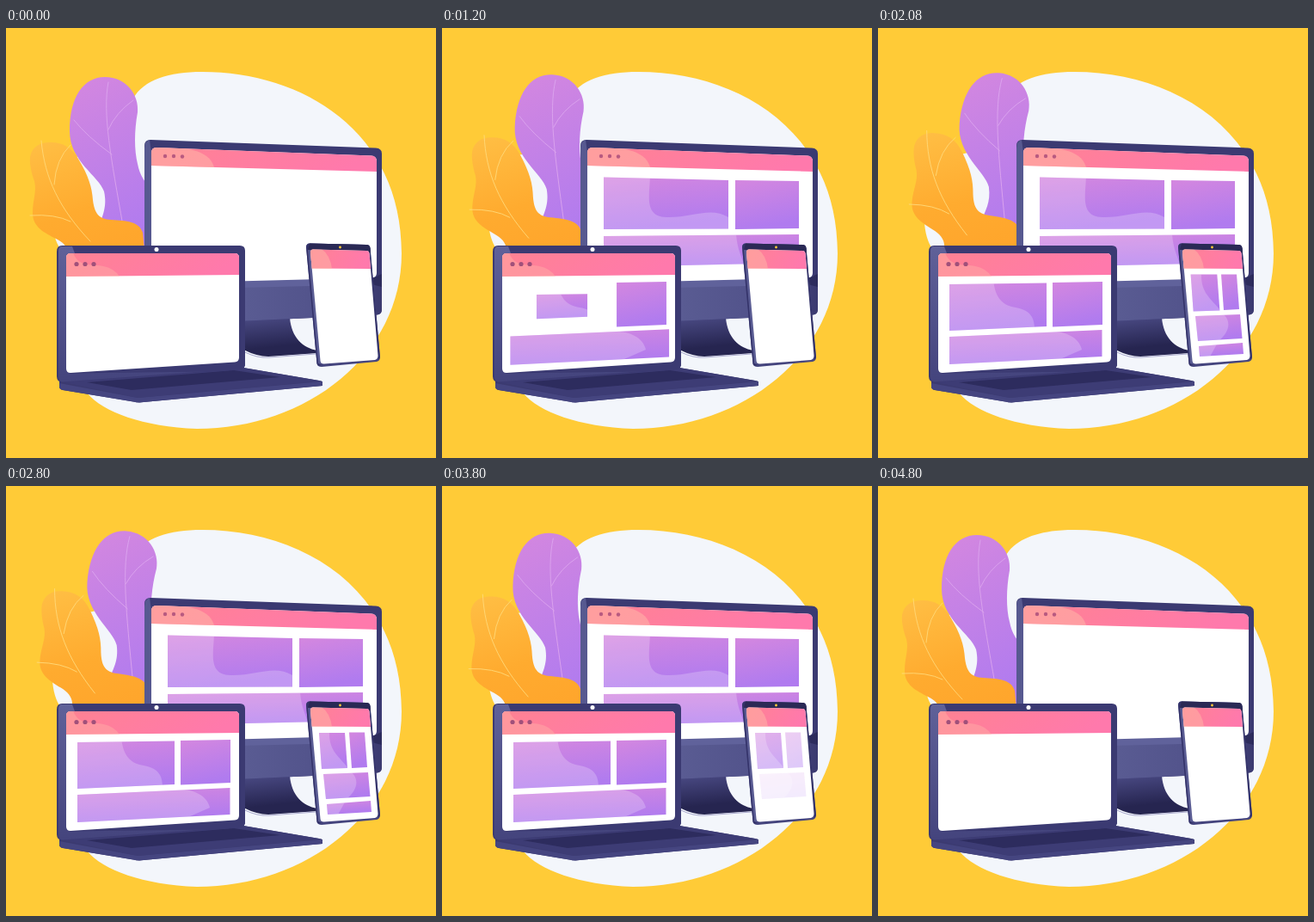
Recreate the animation shown at these times as an HTML page. Size 500 px wide and 500 px high, loop 4840 ms.

```html
<!DOCTYPE html>
<html lang="en">
<head>
<meta charset="utf-8">
<title>Responsive screens</title>
<style>
  html, body { margin: 0; width: 100%; height: 100%; overflow: hidden; background: #ffcb37; }
  svg { display: block; width: 100%; height: 100%; }
  .vein { fill: none; stroke-width: .9; stroke-linecap: round; }
</style>
</head>
<body>
<svg viewBox="0 0 500 500">
  <defs>
    <linearGradient id="violet" x2=".25" y2="1"><stop stop-color="#d487df"/><stop offset="1" stop-color="#b07bef"/></linearGradient>
    <linearGradient id="orange" x2=".3" y2="1"><stop stop-color="#ffbf45"/><stop offset=".55" stop-color="#ffab2f"/><stop offset="1" stop-color="#ffa42b"/></linearGradient>
    <linearGradient id="pink" x2="1" y2=".2"><stop stop-color="#ff8292"/><stop offset="1" stop-color="#ff79ac"/></linearGradient>
    <linearGradient id="chin"><stop stop-color="#5a5c93"/><stop offset=".55" stop-color="#52538b"/><stop offset="1" stop-color="#3b3a70"/></linearGradient>
    <linearGradient id="stand" x2=".2" y2="1"><stop stop-color="#4a4a84"/><stop offset=".8" stop-color="#262550"/></linearGradient>
    <linearGradient id="edge" x2="0" y2="1"><stop stop-color="#5f6199"/><stop offset="1" stop-color="#44447d"/></linearGradient>
    <clipPath id="monitorScreen"><path id="monitorShape" d="M175 139L425 148.500Q431 149 431 155V285Q431 290 425 290.500L169 297V145Q169 139 175 139Z"/></clipPath>
    <clipPath id="laptopScreen"><path id="laptopShape" d="M75 262H266Q271 262 271 267V383Q271 388 266 388.500L75 401Q70 401 70 396V267Q70 262 75 262Z"/></clipPath>
    <clipPath id="phoneScreen"><path id="phoneShape" d="M357 257.500L419 259Q422 259 422.500 262L432.500 381Q432.500 385 429 386L370 390.500Q366 391 365.500 387L354 261Q354 257.500 357 257.500Z"/></clipPath>
  </defs>

  <path fill="#f3f6fb" d="M228 51C345 51 460 120 460 262C460 380 350 466 222 466C160 464 112 446 95 425C88 400 72 280 62 255C50 235 52 200 62 175C75 143 92 149 104 145C140 135 136 105 148 82C160 60 190 51 228 51Z"/>

  <g id="violetLeaf">
    <path fill="url(#violet)" d="M115 57C140 57 155 78 153 98C149 120 149 142 153 158C156 172 160 178 172 190L175 270H105L108 232C112 218 118 208 114 190C108 172 74 155 74 120C74 80 90 57 115 57Z"/>
    <path class="vein" stroke="#dca5ee" d="M119 63C112 100 122 150 136 230M148 84Q128 98 119 118M79 107Q94 126 123 147"/>
  </g>
  <g id="orangeLeaf">
    <path fill="url(#orange)" d="M50 133C64 132 76 138 84 152C96 172 100 185 101 200C103 216 108 222 122 223C140 224 155 225 159 238L165 300H85L73 263C72 254 66 249 58 245C45 238 31 232 31 215C31 200 36 190 33 178C30 170 27 158 28 150C30 138 40 133 50 133Z"/>
    <path class="vein" stroke="#ffd978" d="M41 131C45 175 62 210 98 248M75 136Q58 152 56 182M28 218Q57 216 75 225"/>
  </g>

  <g id="monitor">
    <path fill="url(#stand)" d="M276 338L330 337C332 360 345 372 362 375V378L305 382Q292 382 276 374Z"/>
    <path fill="none" stroke="#a9a9cd" d="M278 377Q292 384 306 383L360 379"/>
    <path fill="#3b3a72" d="M168 130L430 139.500Q437 140 437 146V327Q437 333 431 333.500L270 341L161 300V137Q161 130 168 130Z"/>
    <path fill="#575990" d="M161 140Q161 132 167 130L169 145V300H161Z"/>
    <path fill="#60629b" d="M270 293L437 288V300L270 304Z"/>
    <path fill="url(#chin)" d="M270 302L437 298V327Q437 333 431 333.500L270 341Z"/>
    <path fill="#2d2c5d" d="M425 291L437 286V301L425 298Z"/>
    <use href="#monitorShape" fill="#fff"/>
    <g clip-path="url(#monitorScreen)">
      <path fill="url(#pink)" d="M169 138L432 148V167L169 160Z"/>
      <path fill="#ffb7a8" opacity=".55" d="M169 138L208 140C225 143 238 148 242 162L169 160Z"/>
      <g class="tiles"></g>
    </g>
    <g fill="#b85a80"><circle cx="185" cy="149" r="2.200"/><circle cx="195" cy="149" r="2.200"/><circle cx="205" cy="149.500" r="2.200"/></g>
  </g>

  <g id="laptop">
    <path fill="#3b3a70" d="M62 411L270 394L367 410.500Q368 411 368 416L160 435Q154 436 148 434.500L66 421Q62 420 62 417Z"/>
    <path fill="#454580" d="M62 413L153 430L368 411V416L160 435Q154 436 148 434.500L66 421Q62 420 62 417Z"/>
    <path fill="#3d3c75" d="M62 411L270 394L367 410.500L153 430Z"/>
    <path fill="#2d2c5e" d="M94 412L265 398L319 406L146 421Z"/>
    <path fill="#3b3a72" d="M65 253H272Q278 253 278 259V391Q278 396 272 397L66 412Q59 412 59 405V260Q59 253 65 253Z"/>
    <path fill="url(#edge)" d="M64 254H77L80 262H72L70 265V399L75 402L272 389V396L66 411.500Q61 411 61 405V259Q61 255 64 254Z"/>
    <path fill="#3b3a72" d="M76 401.500L272 388.500L278 382V391Q278 396 272 397L240 399.500Z"/>
    <use href="#laptopShape" fill="#fff"/>
    <g clip-path="url(#laptopScreen)">
      <path fill="url(#pink)" d="M70 261H272V287L70 289Z"/>
      <path fill="#ffb7a8" opacity=".4" d="M70 261H78C84 279 100 274 113 277Q125 279 132 289H70Z"/>
      <g class="tiles"></g>
    </g>
    <g fill="#a0507a"><circle cx="82" cy="274.500" r="2.600"/><circle cx="92" cy="274.500" r="2.600"/><circle cx="102" cy="274.500" r="2.600"/></g>
    <circle cx="175" cy="257.500" r="2.500" fill="#fff"/>
  </g>

  <g id="phone">
    <path fill="url(#edge)" d="M353 250.500L419 252Q423 252 423.500 256L435 383Q435 387 431 388L367 394Q362 394 361.500 390L349 255Q349 250.500 353 250.500Z"/>
    <path fill="#34336a" d="M353 250.500L419 252Q423 252 423.500 256L435 383L433 386L421 262L354 258L366 392Q362 394 361.500 390L349 255Q349 250.500 353 250.500Z"/>
    <path fill="#5a5c93" d="M351 257L354 258L366 391L363 390Z"/>
    <path fill="#2a2955" d="M353 250.500L419 252Q423 252 423.500 256L424 262L351 258Z"/>
    <use href="#phoneShape" fill="#fff"/>
    <g clip-path="url(#phoneScreen)">
      <path fill="url(#pink)" d="M352 257L424 258V280L352 279.500Z"/>
      <path fill="#ffb7a8" opacity=".5" d="M352 257H367Q377 264 379 280H352Z"/>
      <g class="tiles"></g>
    </g>
    <circle cx="388.500" cy="255" r="1.400" fill="#ffcb37"/>
  </g>
</svg>
<script>
const LOOP = 4840, POP = 400, FADE = 320, FADE_STEP = 80;

// Tiles run in order of appearance, bottom first; glow is the fixed light area behind them.
const devices = [
  { id: 'monitor', pop: 190, step: 163, fade: 4250,
    glow: 'M180 165H242C243 190 232 219 261 220C290 221 312 207 333 220V239H342C343 258 350 270 355 284H180Z',
    tiles: [[188, 242, 415, 240, 415, 273, 188, 278],
            [341, 177, 415, 178, 415, 233, 341, 234],
            [188, 173.5, 333, 177, 333, 233.5, 188, 234]] },
  { id: 'laptop', pop: 900, step: 120, fade: 3850,
    glow: 'M75 292H134C136 315 146 323 160 325C178 328 182 338 182 350L200 353C222 352 235 363 237 374L205 388L75 398Z',
    tiles: [[83, 359, 260.5, 351, 260.5, 382, 83, 391],
            [203, 296, 261, 295, 261, 345, 203, 347.5],
            [83, 298, 196, 296.5, 196, 347, 83, 352]] },
  { id: 'phone', pop: 1450, step: 100, fade: 3450,
    glow: 'M360 284H376C375 308 386 313 397 327L402 333C412 343 407 355 396 364L385 384H365Z',
    tiles: [[373, 370, 424, 366, 425, 379, 374, 382],
            [369, 335, 421, 333, 423.5, 361, 372, 364],
            [399, 286.5, 417, 286.5, 420, 327, 402, 328],
            [364, 287, 394, 287, 397, 328, 367, 329]] }
];

const $ = id => document.getElementById(id);
const clamp = v => Math.min(1, Math.max(0, v));

function backOut(p) {
  const x = p - 1;
  return 1 + 2.2 * x ** 3 + 1.2 * x * x;
}

function add(parent, name, attributes) {
  const node = document.createElementNS('http://www.w3.org/2000/svg', name);
  for (const key in attributes) node.setAttribute(key, attributes[key]);
  return parent.appendChild(node);
}

const tiles = devices.flatMap(device => device.tiles.map((points, i) => {
  const clipId = device.id + 'Tile' + i;
  const group = add(document.querySelector(`#${device.id} .tiles`), 'g', {});
  const clip = add(group, 'clipPath', { id: clipId });
  const shapes = [
    add(clip, 'polygon', { points }),
    add(group, 'polygon', { points, fill: 'url(#violet)' })
  ];
  add(group, 'path', { d: device.glow, fill: '#fff', opacity: .22, 'clip-path': `url(#${clipId})` });
  const mean = axis => points.filter((_, k) => k % 2 === axis).reduce((a, b) => a + b) / 4;
  return {
    group, shapes, x: mean(0), y: mean(1),
    pop: device.pop + i * device.step,
    fade: device.fade + i * FADE_STEP
  };
}));

function draw(now) {
  const t = now % LOOP;
  const sway = (1 - Math.cos(2 * Math.PI * t / LOOP)) / 2;
  $('violetLeaf').setAttribute('transform', `rotate(${4.9 * sway} 185 370)`);
  $('orangeLeaf').setAttribute('transform', `rotate(${5.2 * sway} 183 307)`);

  for (const { group, shapes, x, y, pop, fade } of tiles) {
    const scale = Math.max(0, backOut(clamp((t - pop) / POP)));
    group.setAttribute('opacity', t < pop ? 0 : 1 - clamp((t - fade) / FADE));
    for (const shape of shapes)
      shape.setAttribute('transform', `translate(${x} ${y}) scale(${scale}) translate(${-x} ${-y})`);
  }
}

const start = performance.now();
function tick() {
  draw(performance.now() - start);
  requestAnimationFrame(tick);
}
tick();
</script>
</body>
</html>
```
